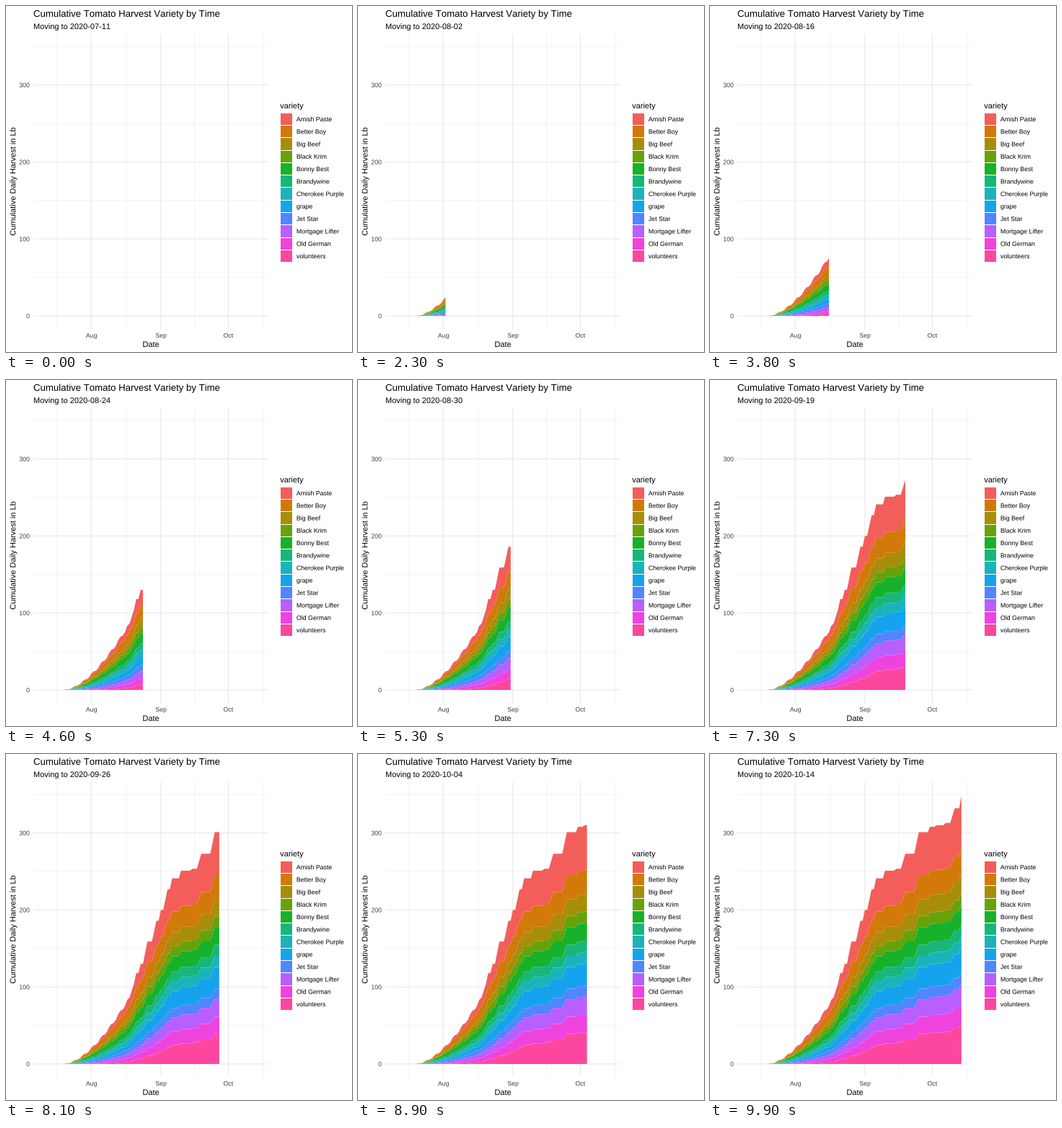
A matplotlib script that plays this animation: 480x480 px, repeating every 10000 ms.

```python
import matplotlib.pyplot as plt
import numpy as np
from matplotlib.animation import FuncAnimation
from matplotlib.patches import PathPatch, Polygon, Rectangle
from matplotlib.textpath import TextPath
from matplotlib.transforms import Affine2D

plt.rcParams["font.family"] = "Liberation Sans"
plt.rcParams["text.kerning_factor"] = 16  # large enough to switch kerning off

SIZE, FRAMES, DAYS = 480, 100, 95
PT = 0.72  # points per pixel at 100 dpi
START = np.datetime64("2020-07-11")
FIRST = 9  # day of the first harvest
X0, DAY_W = 52.9, 3.115
Y0, LB_H = 430.0, 1.0683
LEFT, RIGHT, TOP, BOTTOM = 38.1, 363.6, 38.7, 448.6

# name, colour, final pounds, pace (below 1 ripens early, above 1 late)
VARIETIES = [
    ("Amish Paste", "#f35e5a", 65.7, 1.15),
    ("Better Boy", "#d27909", 34.0, 0.65),
    ("Big Beef", "#a78d09", 25.0, 0.9),
    ("Black Krim", "#68a10a", 15.8, 0.6),
    ("Bonny Best", "#17b12b", 24.9, 0.62),
    ("Brandywine", "#18b67b", 15.7, 0.65),
    ("Cherokee Purple", "#19b4b9", 15.7, 0.6),
    ("grape", "#15a3ed", 32.4, 1.0),
    ("Jet Star", "#5086ff", 15.0, 0.65),
    ("Mortgage Lifter", "#b95eff", 26.3, 1.0),
    ("Old German", "#ef43dd", 26.7, 1.15),
    ("volunteers", "#fd479e", 51.6, 2.0),
]

# large pickings: day and total reached
PICKINGS = [(40, 104), (41, 118), (43, 130), (46, 159), (50, 186), (52, 200),
            (55, 227), (57, 241), (61, 251), (66, 253.5), (70, 273), (76, 301),
            (81, 308), (84, 310), (88, 313), (92, 332), (95, 348.8)]


def day_x(day):
    return X0 + DAY_W * np.asarray(day)


def lb_y(lb):
    return Y0 - LB_H * np.asarray(lb)


def total_harvest(days):
    """Early power growth in four-day waves, then ramps between plateaus."""
    wave = days - 0.5 * np.sin(np.pi / 2 * (days - 18.5))
    early = 76.8 * (np.maximum(wave - FIRST, 0.2) / 27) ** 1.65
    level = 86
    knots = []
    for day, reached in PICKINGS:
        ramp = 2 if reached - level > 17 else 1
        knots += [(day - ramp, level), (day, reached)]
        level = reached
    return np.where(days < 38, early, np.interp(days, *np.transpose(knots)))


def stack_edges(total):
    """Split the total by pace and stack it, first variety on top."""
    final, pace = (np.array([v[k] for v in VARIETIES])[:, None] for k in (2, 3))
    share = final * (total / total[-1]) ** pace
    share *= total / share.sum(axis=0)
    stack = np.cumsum(share[::-1], axis=0)[::-1]
    return lb_y(np.vstack([stack, np.zeros_like(total)]))


fig = plt.figure(figsize=(SIZE / 100, SIZE / 100), dpi=100, facecolor="white")
ax = fig.add_axes([0, 0, 1, 1])
ax.set(xlim=(0, SIZE), ylim=(SIZE, 0))
ax.axis("off")


def glyphs(text, size):
    return TextPath((0, 0), text, size=size)


def label(x, y, text, size, color="black", align=0, angle=0):
    """Text on a baseline; align is 0 for left, 0.5 for centre, 1 for right."""
    path = glyphs(text, size)
    shift = align * path.get_extents().x1
    move = Affine2D().translate(-shift, 0).scale(1, -1).rotate_deg(-angle)
    patch = PathPatch(path, fc=color, lw=0,
                      transform=move.translate(x, y) + ax.transData)
    return ax.add_patch(patch)


def grid(xs, ys, width):
    style = dict(color="#e8e8e8", lw=width * PT, snap=False, zorder=0.5,
                 solid_capstyle="butt")
    for y in ys:
        ax.plot([LEFT, RIGHT], [y, y], **style)
    for x in xs:
        ax.plot([x, x], [TOP, BOTTOM], **style)


# grid and axes
months = [21, 52, 82]
grid(day_x([5.5, 36.5, 67, 97.5]), lb_y([50, 150, 250, 350]), 0.53)
grid(day_x(months), lb_y([0, 100, 200, 300]), 1.07)

for day, name in zip(months, ["Aug", "Sep", "Oct"]):
    label(day_x(day), 460, name, 8.8, "#404040", align=0.5)
for lb in range(0, 400, 100):
    label(32.6, lb_y(lb) + 3.2, str(lb), 8.8, "#404040", align=1)

label(200.8, 473, "Date", 11, align=0.5)
label(13.2, 243.7, "Cumulative Daily Harvest in Lb", 11, align=0.5, angle=90)
label(38, 15, "Cumulative Tomato Harvest Variety by Time", 13.2)
subtitle = label(38, 32, "Moving", 11)

# legend, with swatches on whole pixels
label(380.2, 142, "variety", 11)
for k, (name, color, *_) in enumerate(VARIETIES):
    mid = 156.8 + 17.28 * k
    top, bottom = round(mid - 8), round(mid + 8.2)
    ax.add_patch(Rectangle((381, top), 16, bottom - top, fc=color, lw=0))
    label(402.9, mid + 3.2, name, 8.8)

days = np.arange(FIRST, DAYS + 1)
xs = day_x(days)
edges = stack_edges(total_harvest(days))
areas = [ax.add_patch(Polygon([(0, 0)] * 3, fc=v[1], lw=0, snap=False))
         for v in VARIETIES]


def update(i):
    t = DAYS * i / (FRAMES - 1)
    subtitle.set_path(glyphs(f"Moving to {START + int(t)}", 11))
    n = max(round(t) - FIRST + 1, 0)
    for area, upper, lower in zip(areas, edges, edges[1:]):
        area.set_visible(n > 1)
        if n > 1:
            area.set_xy(np.c_[np.r_[xs[:n], xs[:n][::-1]],
                              np.r_[upper[:n], lower[:n][::-1]]])
    return [subtitle, *areas]


anim = FuncAnimation(fig, update, frames=FRAMES, interval=100,
                     repeat=True, repeat_delay=0, blit=False)
plt.show()
```
